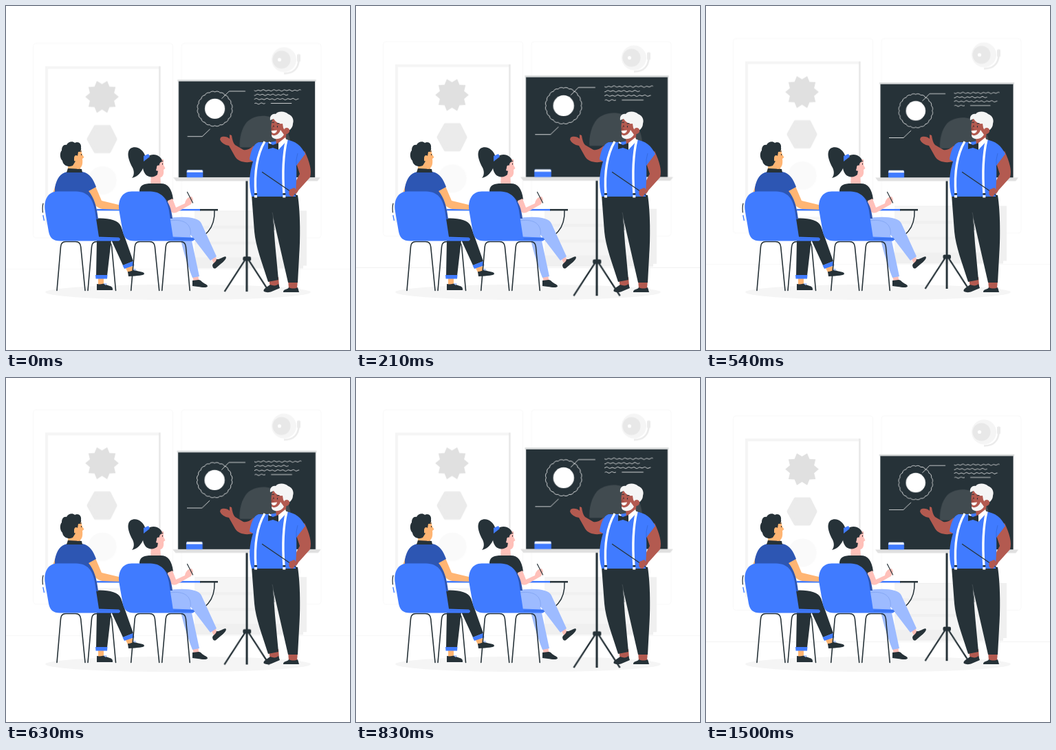
An HTML page for the animation above (1540 ms loop, 500x500 px).

```html
<!DOCTYPE html>
<html lang="en">
<head>
<meta charset="utf-8">
<title>Classroom</title>
<style>
  html, body { margin: 0; width: 100%; height: 100%; overflow: hidden; background: #fff; }
  svg { display: block; width: 100vw; height: 100vh; }
  #board { transform-origin: 350px 261px; }
  .ink { fill: #263238; }
  .blue { fill: #407bff; }
  .navy { fill: #2d56b3; }
  .tan { fill: #ffb573; }
  .pink { fill: #ffc0b9; }
  .brown { fill: #b35a50; }
  .white { fill: #fff; }
  .line { fill: none; stroke: #263238; stroke-linecap: round; stroke-linejoin: round; }
  .chalk { fill: none; stroke: #fff; stroke-width: .75; stroke-linejoin: round; }
</style>
</head>
<body>
<svg viewBox="0 0 500 500">
  <ellipse cx="250" cy="416" rx="193" ry="11.3" fill="#f5f5f5"/>

  <g id="room">
    <g fill="none" stroke="#f8f8f8">
      <rect x="39.5" y="55" width="203" height="282.5" rx="4"/>
      <rect x="255" y="55" width="203" height="282.5" rx="4"/>
      <path d="M0 383.5H500" stroke="#f3f3f3"/>
    </g>
    <rect x="57" y="88" width="167.5" height="230" fill="#f5f5f5"/>
    <path d="M222 88h2.5v230h-2.5z" fill="#e9e9e9"/>
    <rect x="61" y="92" width="161" height="222" fill="#fff"/>
    <path id="star" fill="#e0e0e0"/>
    <path d="M130 176H150L159 194 150 212H130L120 194Z" fill="#ebebeb" stroke="#ebebeb" stroke-width="5" stroke-linejoin="round"/>
    <circle cx="140" cy="254" r="20.5" fill="#fafafa"/>
    <path d="M274 298H437V378H432V382H274Z" fill="#f0f0f0"/>
    <path d="M274 299H428V320H274ZM274 324H428V343H274ZM274 347H428V366H274Z" fill="#f5f5f5"/>
    <path d="M425.5 79C425 91 418 99 404 98.5" fill="none" stroke="#ebebeb" stroke-width="2.6"/>
    <rect x="423" y="70.5" width="5" height="11" rx="1.5" fill="#ebebeb"/>
    <circle cx="404" cy="78.5" r="18" fill="#f5f5f5"/>
    <circle cx="400.5" cy="78.5" r="13" fill="#e8e8e8"/>
    <circle cx="397.5" cy="78.5" r="2.6" class="white"/>
  </g>

  <g id="board">
    <path class="line" stroke-width="2.2" style="stroke-linecap:butt" d="M347 367 318.500 411M353 367 381.500 411"/>
    <path class="ink" d="M348.500 254h3V411h-3z"/>
    <rect class="ink" x="344.500" y="361.500" width="11.500" height="6" rx="2"/>
    <rect x="252" y="111" width="196" height="3" fill="#dfe1e1"/>
    <rect class="ink" x="253.500" y="113.500" width="193" height="136"/>
    <path d="M246 249.500H454L450 254.500H250Z" fill="#e0e0e0"/>
    <path d="M340 207C339 194 343 179 350 171 358 163 372 160 384 164 402 170 412 185 412 207Z" fill="#414b50"/>
    <rect class="blue" x="265" y="239" width="23" height="10.500" rx="1"/>
    <path class="white" d="M266 239h21l1 3.200h-23z"/>
    <circle class="white" cx="304.800" cy="152.300" r="14.200"/>
    <path class="chalk" id="ring"/>
    <path class="chalk" d="M314.500 138 325 127.500H348M266 191.500H287L298 181M384 144.600H413.500"/>
    <path class="chalk" id="notes"/>
  </g>

  <g id="teacher">
    <path class="brown" d="M382 396 396 394 397 407 384 409ZM410 398H424L423 411H411Z"/>
    <path class="ink" d="M375 415C373 412 377 410 384 405 389 407 393 407 396 404L398 410 385 415.500Q379 417 375 415ZM403 415C404 411 410 412 411 409 415 411 420 411 424 409L426 416H403Z"/>
    <path class="ink" d="M357 275H424C428 300 428 340 426 365L424 402H410L388 306 391 345 396 398 381 401C372 372 363 350 361 328Z"/>
    <path d="M387 300Q389 306 390 326" fill="none" stroke="#465055" stroke-width=".8"/>
    <path class="brown" d="M360 203C354 208 350 210 345 209L333 202C330 199 329 194 328 188L325 187 325 193C321 189 315 189 312 191L311 194C313 199 318 202 324 203L333 219C337 226 348 229 359 226Z"/>
    <path class="brown" d="M434 211C441 226 445 239 442 249L425 268C421 276 415 279 411 274 409 270 412 265 417 263L427 244 420 223Z"/>
    <path class="blue" d="M367 198C362 200 357 205 354 223L359 226C354 242 352 260 357 277H421C421 264 423 250 422 232L435 215C429 203 421 196 406 194L384 198Z"/>
    <path d="M424 214Q421 223 422 232" fill="none" stroke="#3467d8" stroke-width=".8"/>
    <path d="M376 197C363 219 361 246 363 274M408 194C402 220 402 247 404 274" fill="none" stroke="#fff" stroke-width="3.400"/>
    <path class="ink" d="M361 272h4v2.500h-4zM402.300 272h4v2.500h-4z"/>
    <path class="white" d="M361 275h4v3.500h-4zM402.300 275h4v3.500h-4z"/>
    <path class="brown" d="M392 186 408 181 406 198 393 206Z"/>
    <path class="white" d="M406 191 408 196 396 209 391 203ZM382 197 386 199 382 204Z"/>
    <path class="ink" d="M381 199 388 202 396 199 396 209 388 206 381 208Z"/>
    <path class="brown" d="M388 164C384 172 386 180 386 185 386 192 391 194 398 191 405 188 410 178 407 167Z"/>
    <path d="M386 187C390 190 397 187 399 180L404 187C401 192 396 194 391 193 387 192 386 190 386 187Z" fill="#f5f5f5"/>
    <path d="M384 166C383 160 387 156 392 157 396 152 406 153 410 157 416 159 419 165 417 171 417 177 412 181 407 184L403 177 402 171C395 172 391 167 389 164Z" fill="#f5f5f5"/>
    <path class="brown" d="M404 180C405 176 411 176 412 180 413 185 407 188 403 185Z"/>
    <path class="white" d="M385.500 181.500 394 180.500C393 186 387 187 385.500 181.500Z"/>
    <path class="line" stroke-width="1.100" d="M387 169.500 389.500 169M394 171 397 170.500M389 174v1.500M394.500 174.500v1.500"/>
    <path d="M389 173 386 179H389" fill="none" stroke="#85403a" stroke-width=".8"/>
    <path class="line" stroke-width="1.300" d="M372.500 241.500 423 276"/>
    <path class="brown" d="M412 267 419 264 423 269 417 277Q409 277 412 267Z"/>
  </g>

  <g id="table">
    <path d="M132 296.300H283" stroke="#407bff" stroke-width="2.500"/>
    <path d="M282 296.300H308" stroke="#263238" stroke-width="2.500"/>
    <path class="line" stroke-width="1.500" d="M303 297C304 321 291 340 264 340"/>
    <path class="line" stroke-width="1.200" d="M54 287Q52.500 292 53.500 300"/>
    <path d="M53.800 304 55.500 312" stroke="#407bff" stroke-width="1.300"/>
  </g>

  <g id="girl">
    <path class="pink" d="M298 366 304 363 307 371 302 374ZM271 392 279 391 281 402 273 402Z"/>
    <path class="ink" d="M300 377C301 373 305 373 306 368 310 369 314 365 319 364 322 366 317 371 312 375L305 381Q301 383 300 377ZM271 399C276 399 280 397 283 399 286 403 292 404 293 407 293 410 285 409 279 408L271 407Z"/>
    <path d="M232 309C255 305 280 306 284 316L306 364 297 370 268 332 281 393 271 395C264 377 258 357 254 340L230 338Z" fill="#9dbbff"/>
    <path d="M239 312C260 309 270 318 268 333" fill="none" stroke="#83a5f2" stroke-width=".9"/>
    <path class="pink" d="M211 244 224 246 225 260 210 261Z"/>
    <path class="ink" d="M194 268C195 260 201 258 211 258H225C235 258 241 265 243 281L235 284 236 310H195Z"/>
    <path class="pink" d="M235 283 242 280 247 293 260 287C261 281 265 277 270 277L272 281 269 288 248 300C242 302 238 299 237 294Z"/>
    <path class="line" stroke-width="1.200" d="M263.500 270.500 271.500 286"/>
    <path class="pink" d="M218 223H229L229 231 231.500 236 229 238C230 246 227 250 222 249L214 243Z"/>
    <path class="ink" d="M200 229C202 216 216 213 223 219 227 222 228 226 225 227 223 228 223 231 222 234L220 245C215 250 207 249 203 245 199 240 198 234 200 229Z"/>
    <path class="ink" d="M203 220C200 208 189 202 181 207 174 213 179 226 184 235 187 241 186 247 183 250 192 248 197 241 200 234Z"/>
    <path class="blue" d="M200 218 207 215 209 219 200 226Z"/>
    <path class="pink" d="M219 235C219 230 224 231 225 235 225 239 221 241 218 239Z"/>
    <path class="line" stroke-width="1" d="M227.500 229v1.200M225.500 226l2.500-.5"/>
  </g>

  <g id="boy">
    <path class="tan" d="M134 394 142 394 142 406 134 406ZM173 379 183 377 186 387 178 389Z"/>
    <path class="ink" d="M132 404C137 405 140 404 143 403 146 407 155 406 155 411V413H132ZM177 386C182 386 184 384 187 383 190 387 200 385 201 389 201 392 191 392 178 393Z"/>
    <path d="M141 403 147 403 145 406ZM183 382 189 382 188 385Z" fill="#a9c3ff"/>
    <path class="ink" d="M125 309C145 307 163 310 167 320L185 371 170 377 153 340 147 392H131L132 338Z"/>
    <path class="blue" d="M130 391H147.500L147 396.500H130.500ZM169.500 377 184.500 371 186.500 377 172 382Z"/>
    <path class="tan" d="M74 255 68 272 82 272ZM115 267 130 262 139 283 164 289 167 296 140 295C132 294 126 287 115 273Z"/>
    <path class="tan" d="M91 226 107 230 109 242 89 243Z"/>
    <path class="navy" d="M71 264C74 250 79 243 89 241H111C122 243 127 252 131 263L120 269C128 279 132 291 134 310H70Z"/>
    <path class="ink" d="M90 236 110 237 111 242H88Z"/>
    <path class="tan" d="M96 209H109L111 216 113.500 220 111 222C112 231 110 236 104 237L95 231Z"/>
    <path class="ink" d="M81 210C81 204 84 201 88 202 90 197 97 196 100 199 105 196 110 200 109 206 110 210 107 212 105 212L104 218 102 224 97 232C91 235 83 232 82 225 78 221 78 213 81 210Z"/>
    <path class="tan" d="M99 221C99 216 104 216 105 220 106 225 102 227 99 225Z"/>
    <path class="line" stroke-width="1" d="M109.500 215.500v1.200M107 211.500l2.500-.5"/>
  </g>

  <defs>
    <g id="chair">
      <path class="line" stroke-width="1.600" d="M74 413.500 79.500 350Q80 342.500 87 342.500H101Q108 342.500 108.700 350L115 413.500M119 413.500 124.500 350Q125 342.500 132 342.500H146Q153 342.500 153.700 350L159.500 413.500"/>
      <path class="blue" d="M75 269.500H102C119 270 126 280 129 296L135 335.500 164 336.500Q168 339 164 341.500H79C68 341.500 64 337 62 328L57 299C54 282 61 269.500 75 269.500Z"/>
      <path d="M136 338.500H165" stroke="#3467d8" stroke-width=".8"/>
    </g>
  </defs>
  <path class="navy" d="M208 270C229 270 239 284 242 309H225Z"/>
  <use href="#chair"/>
  <use href="#chair" x="107.700"/>
</svg>

<script>
  const $ = id => document.getElementById(id);
  const polar = (cx, cy, r, a) =>
    `${(cx + r * Math.cos(a)).toFixed(2)} ${(cy + r * Math.sin(a)).toFixed(2)}`;
  const range = n => [...Array(n).keys()];

  $('star').setAttribute('d', 'M' + range(20).map(i =>
    polar(139.5, 132.6, i % 2 ? 18.5 : 24.3, i * Math.PI / 10)).join('L') + 'Z');

  const scallops = 20;
  $('ring').setAttribute('d', 'M' + range(scallops + 1).map(i =>
    polar(304.8, 152.3, 23.8, i * 2 * Math.PI / scallops)).join('A5.5 5.5 0 0 1 ') + 'Z');

  // Handwritten chalk lines: start, end, height.
  const rows = [[360.5, 427, 126.3], [360.5, 409, 132.5], [360.5, 423.5, 138.6], [361, 376, 144.8]];
  $('notes').setAttribute('d', rows.map(([x0, x1, y], row) =>
    'M' + range(Math.floor(x1 - x0) + 1).map(i => {
      const dy = .7 * Math.sin(i * .85 + row) + .35 * Math.sin(i * .37 + row * 2);
      return `${x0 + i} ${(y + dy).toFixed(2)}`;
    }).join('L')).join(''));

  const timing = { duration: 1540, iterations: Infinity, iterationStart: 41 / 1540 };
  const loop = (id, fn, steps) => $(id).animate(
    steps.map(([offset, v]) => ({ offset, transform: `${fn}(${v})` })), timing);

  loop('board', 'scale', [[0, 1], [.1, 1.1], [.3, 1], [.4, 1], [.5, 1.1], [.7, 1], [1, 1]]);
  loop('room', 'translateY', [[0, '0px'], [.5, '-10px'], [1, '0px']]);
</script>
</body>
</html>
```
